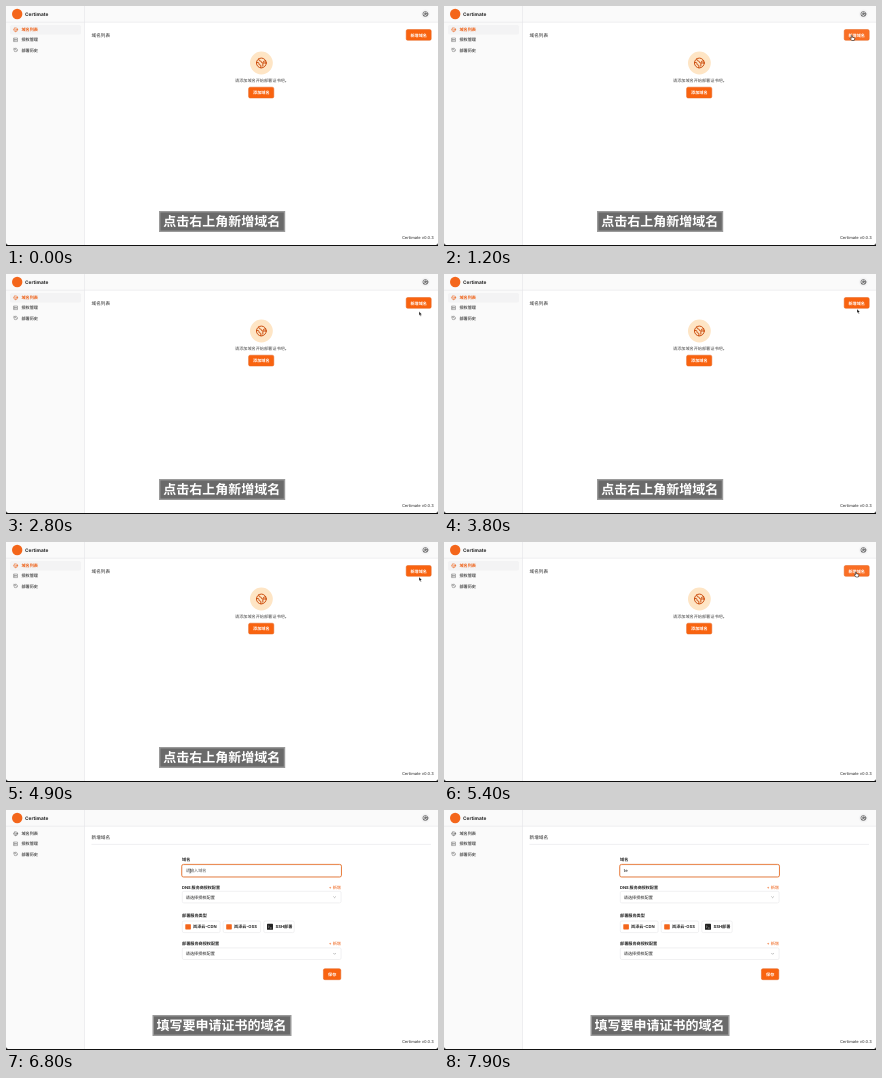
An HTML page that plays this animation: 432x240 px, repeating every 8 s.

```html
<!DOCTYPE html>
<html lang="zh-CN">
<head>
<meta charset="utf-8">
<title>Certimate</title>
<style>
  html, body { margin: 0; width: 100%; height: 100%; overflow: hidden; background: #fff; }
  svg { display: block; width: 432px; height: 240px; }
  text {
    font: 500 4.15px Inter, "Noto Sans CJK SC", "Noto Sans CJK", sans-serif;
    fill: #222; white-space: pre; text-rendering: geometricPrecision;
  }
  .bold { font-weight: 700; }
  .title { font-size: 4.6px; }
  .white { fill: #fff; }
  .orange { fill: #ee5f14; }
  .soft { fill: #444; }
  .button { fill: #f9630f; stroke: #e2621f; stroke-width: .5; }
  .box { fill: #fff; stroke: #e2e2e4; stroke-width: .5; }
  .line { fill: none; stroke: #e4e4e7; stroke-width: .6; }
  .icon { fill: none; stroke: currentColor; stroke-width: 2; stroke-linecap: round; stroke-linejoin: round; }
  .nav text { font-weight: 700; fill: currentColor; }
  .caption rect { fill: #6a6a6a; stroke: #9a9a9a; stroke-width: 1.4; }
  .caption text { font-size: 13px; font-weight: 700; fill: #fff; }
</style>
</head>
<body>
<svg viewBox="0 0 432 240">
  <defs>
    <g id="globe" class="icon">
      <circle cx="12" cy="12" r="10"/>
      <path d="M21.5 12H17a2 2 0 0 0-2 2v4.5M7 3.4V5a3 3 0 0 0 3 3 2 2 0 0 1 2 2c0 1.1.9 2 2 2a2 2 0 0 0 2-2c0-1.1.9-2 2-2h3M11 21.9V18a2 2 0 0 0-2-2 2 2 0 0 1-2-2v-1a2 2 0 0 0-2-2H2"/>
    </g>
    <g id="server" class="icon">
      <path d="M3 3h18v8H3zM3 13h18v8H3zM7 7h.1M7 17h.1"/>
    </g>
    <g id="history" class="icon">
      <path d="M3 12a9 9 0 1 0 3-6.7L3 8M3 3v5h5M12 7v5l4 2"/>
    </g>
    <g id="user" class="icon">
      <circle cx="12" cy="12" r="10"/><circle cx="12" cy="10" r="3"/>
      <path d="M6 19v-1a3 3 0 0 1 3-3h6a3 3 0 0 1 3 3v1"/>
    </g>
    <path id="chevron" d="M-1.2-.6L0 .6 1.2-.6" fill="none" stroke="#777" stroke-width=".5"/>
  </defs>

  <rect width="432" height="240" fill="#fff"/>
  <rect width="78.5" height="240" fill="#fafafa"/>
  <rect width="432" height="16" fill="#fafafa"/>
  <path class="line" d="M0 16.2H432M78.5 0V240"/>
  <circle cx="11.2" cy="8" r="5.2" fill="#f4661b"/>
  <text class="bold" x="19" y="9.6" style="font-size:4.8px">Certimate</text>
  <circle cx="419.4" cy="8" r="4.6" fill="#f4f4f5"/>
  <use href="#user" transform="translate(416.4 5) scale(.25)" color="#222"/>

  <rect id="active" x="4" y="19" width="71" height="9.6" rx="1.5" fill="#f3f3f4"/>
  <g class="nav" color="#555">
    <g id="first">
      <use href="#globe" transform="translate(7.3 21.3) scale(.2)"/>
      <text x="15.4" y="25.3">域名列表</text>
    </g>
    <use href="#server" transform="translate(7.3 31.4) scale(.2)"/>
    <text x="15.4" y="35.4">授权管理</text>
    <use href="#history" transform="translate(7.3 41.6) scale(.2)"/>
    <text x="15.4" y="45.6">部署历史</text>
  </g>
  <text class="soft" x="395.9" y="232.6" style="font-size:4px">Certimate v0.0.3</text>

  <g id="list">
    <text class="title" x="85.6" y="30.7">域名列表</text>
    <rect id="add" class="button" x="400.2" y="23.5" width="25" height="10.8" rx="1.5"/>
    <text class="bold white" x="404.4" y="30.5">新增域名</text>
    <circle cx="255.4" cy="57" r="11.4" fill="#fee5c5"/>
    <use href="#globe" transform="translate(249.5 51.1) scale(.49)" color="#cc4c0c"/>
    <text class="soft" x="229" y="76.1">请添加域名开始部署证书吧。</text>
    <rect class="button" x="242.6" y="81.2" width="25.2" height="10.8" rx="1.5"/>
    <text class="bold white" x="247" y="88.2">添加域名</text>
  </g>

  <g id="form">
    <text class="title" x="85.6" y="28.5">新增域名</text>
    <path class="line" d="M85.5 34.4H425"/>
    <text class="bold" x="176" y="51">域名</text>
    <rect class="box" x="176.3" y="55" width="158.8" height="11.6" rx="1.5"/>
    <rect id="ring" x="175.7" y="54.4" width="159.8" height="12.6" rx="1.8" fill="none" stroke="#e8742f" stroke-width=".9"/>
    <text id="value" x="179.8" y="62.3"></text>
    <text class="bold" x="176" y="78.5" style="font-size:4.05px">DNS 服务商授权配置</text>
    <text class="bold" x="176" y="107">部署服务类型</text>
    <text class="bold" x="176" y="135.2">部署服务商授权配置</text>
    <g id="selects"></g>
    <rect class="box" x="176.3" y="111" width="37.8" height="11.6" rx="1.5"/>
    <rect x="179.3" y="114.2" width="5.6" height="5.2" rx=".6" fill="#f4661b"/>
    <text class="bold" x="187" y="118.4">岚泽云-CDN</text>
    <rect class="box" x="217.2" y="111" width="37.4" height="11.6" rx="1.5"/>
    <rect x="220.2" y="114.2" width="5.6" height="5.2" rx=".6" fill="#f4661b"/>
    <text class="bold" x="228" y="118.4">岚泽云-OSS</text>
    <rect class="box" x="257.8" y="111" width="30.4" height="11.6" rx="1.5"/>
    <rect x="261" y="113.8" width="6" height="6" rx=".6" fill="#222"/>
    <path d="M262.2 115.8l1 .9-1 .9M264 118h1.6" fill="none" stroke="#fff" stroke-width=".45"/>
    <text class="bold" x="269.6" y="118.4">SSH部署</text>
    <rect class="button" x="317.4" y="158.7" width="17.4" height="11" rx="1.5"/>
    <text class="bold white" x="322" y="165.8">保存</text>
  </g>

  <g id="cap1" class="caption">
    <rect x="153.7" y="205.7" width="124.8" height="19.6"/>
    <text x="157.3" y="220.2">点击右上角新增域名</text>
  </g>
  <g id="cap2" class="caption">
    <rect x="147.2" y="205.7" width="137.6" height="19.6"/>
    <text x="150.5" y="220.2">填写要申请证书的域名</text>
  </g>
  <path d="M0 236.5Q0 239 2.5 239H429.5Q432 239 432 236.5V240H0Z" fill="#111"/>

  <g id="cursor">
    <path id="arrow" d="M0 0V4.2L1 3.3 1.7 4.8 2.4 4.5 1.7 3.1H3Z" fill="#111" stroke="#fff" stroke-width=".35"/>
    <path id="hand" d="M-.2 0Q.4-.5.7.1V1.7L2.9 2.2Q3.4 2.5 3.2 3.2L2.7 5H.2L-1.3 3Q-1.1 2.3-.2 2.8Z" fill="#fff" stroke="#111" stroke-width=".55"/>
    <path id="beam" d="M-.8-2.1Q0-2.1 0-1.5 0-2.1.8-2.1M0-1.5V1.5M-.8 2.1Q0 2.1 0 1.5 0 2.1.8 2.1" fill="none" stroke="#333" stroke-width=".5"/>
  </g>
</svg>
<script>
  const LOOP = 8000, STEP = 100;
  const $ = id => document.getElementById(id);
  const show = (id, on) => $(id).style.display = on ? '' : 'none';

  $('selects').innerHTML = [[78.5, 81.3], [135.2, 137.9]].map(([label, top]) => `
    <text class="orange" x="322.8" y="${label}">+ 新增</text>
    <rect class="box" x="176.3" y="${top}" width="158.8" height="11.6" rx="1.5"/>
    <text x="179.8" y="${top + 7.3}">请选择授权配置</text>
    <use href="#chevron" transform="translate(328.6 ${top + 5.8})"/>`).join('');

  // time, x, y
  const path = [
    [100, 306, 155], [800, 407.5, 29.5], [1500, 407.5, 29.5], [1900, 413, 37.4],
    [3000, 413, 37.4], [3400, 413, 34.9], [4900, 413, 34.9], [5200, 411.6, 30],
    [6100, 411.6, 30], [6500, 184.3, 61], [8000, 184.3, 61]
  ];

  function cursorAt(t) {
    const i = Math.max(1, path.findIndex(p => p[0] > t));
    const [t0, x0, y0] = path[i - 1], [t1, x1, y1] = path[i];
    const k = Math.min(1, Math.max(0, (t - t0) / (t1 - t0)));
    const e = k * k * (3 - 2 * k);
    return [x0 + (x1 - x0) * e, y0 + (y1 - y0) * e];
  }

  function draw(t) {
    const form = t >= 5700;
    const typed = 'te'.slice(0, Math.max(0, Math.floor((t - 7400) / 200)));
    show('list', !form);
    show('active', !form);
    show('form', form);
    show('ring', t >= 6700);
    show('cap1', t < 5000);
    show('cap2', t >= 5800);
    $('first').setAttribute('color', form ? '#555' : '#ee5f14');

    const [x, y] = cursorAt(t);
    const hover = !form && x > 400 && y > 23 && y < 34.5;
    const text = form && x > 176 && x < 335 && y > 55 && y < 67;
    show('cursor', t >= 100 && !typed);
    $('cursor').setAttribute('transform', `translate(${x} ${y})`);
    show('hand', hover);
    show('beam', text);
    show('arrow', !hover && !text);
    $('add').style.fill = hover ? '#fa6f25' : '';

    $('value').textContent = typed || '请输入域名';
    $('value').style.fill = typed ? '' : '#555';
  }

  const start = performance.now();
  function tick() {
    const t = (performance.now() - start) % LOOP;
    draw(Math.floor(t / STEP) * STEP);
    requestAnimationFrame(tick);
  }
  tick();
</script>
</body>
</html>
```
